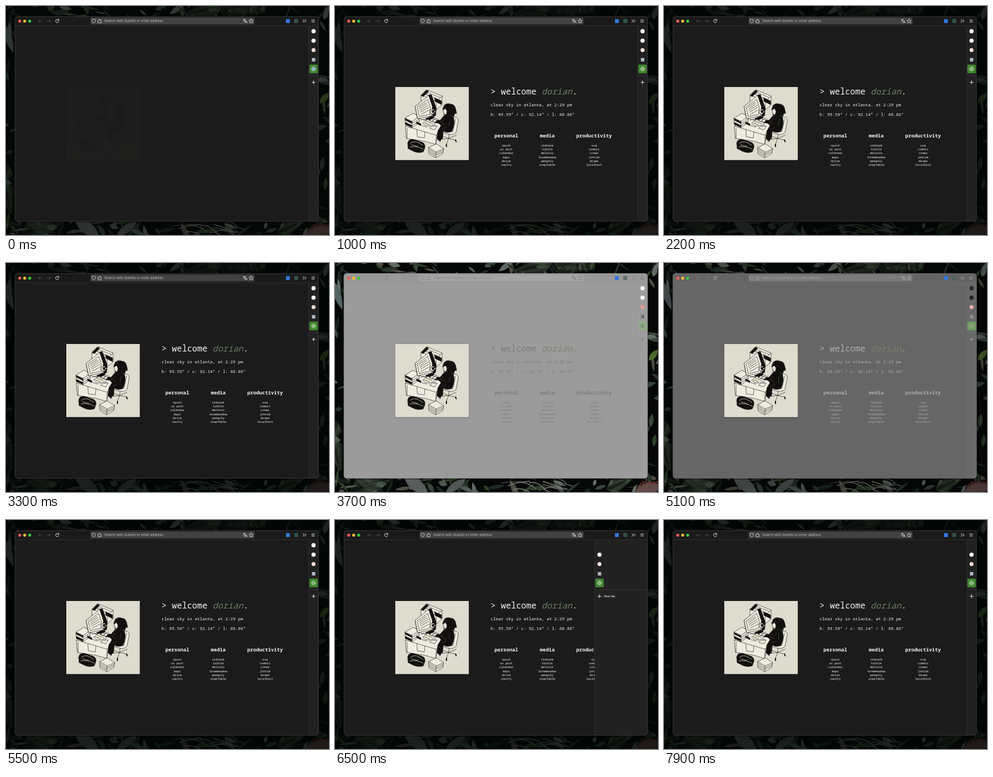
Write an HTML page that moves like this. It is 600 px wide and 427 px high and loops after 8000 ms.

```html
<!DOCTYPE html>
<html lang="en">
<head>
<meta charset="utf-8">
<title>Start page theme switch</title>
<style>
html, body { margin: 0; width: 100%; height: 100%; overflow: hidden; background: #050807; }
svg { display: block; width: 100vw; height: 100vh; }
text { white-space: pre; }
.mono { font-family: "Noto Sans Mono", "DejaVu Sans Mono", monospace; fill: var(--fg); }
.ui { font-family: Inter, "Liberation Sans", sans-serif; }
.icon { fill: none; stroke: var(--icon); stroke-width: 1; stroke-linecap: round; stroke-linejoin: round; }
.thin { stroke-width: .75; }
.ink { fill: none; stroke: #171613; stroke-width: .65; stroke-linejoin: round; stroke-linecap: round; }
.paper { fill: #eeece0; }
.black { fill: #11100e; }
</style>
</head>
<body>
<svg id="stage" viewBox="0 0 600 427" preserveAspectRatio="none">
  <defs>
    <clipPath id="frame"><rect x="16.5" y="19.5" width="564" height="382" rx="5"/></clipPath>
  </defs>

  <rect width="600" height="427" fill="#070b09"/>
  <g id="jungle"></g>
  <rect id="night" width="600" height="427" fill="#020504"/>

  <rect x="15.5" y="19.5" width="566" height="384" rx="6" fill="#000" opacity=".45"/>
  <g clip-path="url(#frame)">
    <rect x="16" y="19" width="565" height="383" fill="var(--bg)"/>

    <g id="page">
      <rect x="111" y="150" width="139" height="139.500" fill="#000" opacity=".12"/>
      <rect x="112" y="151" width="136.500" height="136.300" fill="#dedbcf"/>
      <g id="art" class="ink">
        <!-- boxes behind the screen -->
        <path class="paper" d="M160 166L170 156L199 168L199 184L188 194L160 181Z"/>
        <path d="M160 166L188 178L199 168M188 178V194M164 163L192 175M167 159L196 171M172 157L171 166"/>
        <path class="black" d="M160 167L170 157L174 159L164 169ZM185 171L198 177V184L186 178Z"/>
        <!-- desk -->
        <path class="paper" d="M131 224L165 203L203 220L189 248L187 258L166 252L133 247Z"/>
        <path d="M131 224L188 241L201 221M188 241L187 258M152 231L153 244L166 246L167 235M134 228V247"/>
        <!-- left stack -->
        <path class="paper" d="M130 209L145 200L157 206L156 218L143 227L131 221Z"/>
        <path d="M130 209L143 215L157 206M143 215V227M131 213L143 219L156 211M131 217L143 223L156 215"/>
        <path class="black" d="M131 210L143 216V219L131 213ZM131 217L143 223V226L131 221Z"/>
        <!-- screen -->
        <path class="paper" d="M149 187L166 174L178 183L186 204L168 213L153 209Z"/>
        <path class="black" d="M174 166L179 165L188 190L187 204L182 207L177 184Z"/>
        <path class="paper" d="M149 187L174 167L181 188L179 205L154 210Z"/>
        <path d="M153 188L172 174L177 189L176 202L157 206Z"/>
        <path d="M156 189L169 180M157 192L171 182M158 195L173 185M159 198L174 189M160 202L175 194M178 168L185 189"/>
        <path class="black" d="M168 210L180 205L185 208L173 214Z"/>
        <!-- desk clutter -->
        <path class="paper" d="M163 218L173 211L180 216L187 209L193 213L185 220L177 224L168 223ZM177 194L183 192L187 197L182 202L177 200Z"/>
        <path d="M166 218L176 222M170 215L181 219M174 213L183 216M160 213L166 211L169 214M158 222L171 226M181 225L187 222"/>
        <path class="black" d="M152 216L160 220L159 223L151 219ZM180 195L185 194L184 199L181 199Z"/>
        <path d="M181 224L190 224L185 231L176 228Z" fill="#eeece0"/>
        <path d="M169 220L171 216M174 221L177 216" stroke="#b88d45"/>
        <!-- chair -->
        <path class="paper" d="M217 207Q230 206 229 214L225 235Q220 241 211 239L201 236L202 230L214 230Z"/>
        <path d="M224 211L219 234L205 235M212 239L211 247M211 247L196 249M211 247L224 250M211 247L207 258M211 247L225 241M211 247L198 242"/>
        <path d="M196 249L195 252M224 250L225 253M207 258V262M198 242L197 245" stroke-width="2.200"/>
        <!-- figure at the desk -->
        <path class="black" d="M203 204Q211 201 220 207Q224 220 217 234Q208 238 201 233L200 247L193 251L189 247L191 233L197 223L193 219L184 217L184 213L195 213Z"/>
        <path class="black" d="M203 185Q208 180 215 183Q222 183 224 191L226 200L222 201L221 206L215 204L209 206L206 202L202 203L203 198L200 193Z"/>
        <path class="paper" d="M201 194L205 191L208 196L207 202L203 202ZM182 213L187 211L189 215L184 217Z"/>
        <path d="M202 212L196 217L205 221M206 226L198 230M214 211L212 223" stroke="#77756d" stroke-width=".4"/>
        <!-- bag -->
        <path class="black" d="M135 255Q137 247 147 249L162 254Q168 257 167 264L164 272Q155 275 146 271L136 266Z"/>
        <path d="M140 256Q147 250 157 256L163 260M139 263Q151 260 164 267M142 259L154 262" stroke="#d8d5c8" stroke-width=".8"/>
        <!-- front stack -->
        <path class="paper" d="M174 264L188 257L202 266L200 275L187 283L175 276Z"/>
        <path d="M174 264L188 272L202 266M188 272L187 283M175 267L188 275L201 269M175 270L188 278L201 272M175 273L187 280"/>
      </g>

      <text class="mono" x="289" y="165" font-size="15.800">&gt; welcome <tspan font-style="italic" fill="var(--name)">dorian</tspan>.</text>
      <text class="mono" x="289" y="187" font-size="7.900">clear sky in atlanta, at 2:29 pm</text>
      <text class="mono" x="289" y="205" font-size="7.900">h: 95.59° / c: 92.14° / l: 88.86°</text>
      <g id="links" class="mono" text-anchor="middle"></g>
    </g>

    <!-- toolbar -->
    <rect x="16" y="19" width="565" height="17.500" fill="var(--bar)"/>
    <path d="M16 36.800H581" stroke="var(--line)" stroke-width=".8"/>
    <circle cx="25.500" cy="28.200" r="2.800" fill="#f05d55"/>
    <circle cx="34.700" cy="28.200" r="2.800" fill="#f4bd35"/>
    <circle cx="44" cy="28.200" r="2.800" fill="#31c944"/>
    <rect x="157" y="21.500" width="304.500" height="12.800" rx="2" fill="var(--field)"/>
    <text class="ui" x="182.500" y="30.300" font-size="6.300" fill="var(--hint)">Search with Quento or enter address</text>
    <g class="icon thin">
      <path d="M67 28H60.500M63 25.500L60.500 28L63 30.500M76 28H82.500M80 25.500L82.500 28L80 30.500" stroke="var(--dim)"/>
      <path d="M97.600 26.300A3 3 0 1 0 98 29M98 24.800V26.800H96" stroke-width="1"/>
      <path d="M163 24.500L166 25.600V28Q165.500 30.600 163 31.700Q160.500 30.600 160 28V25.600Z"/>
      <path d="M171 27H172.800V25.800A1 1 0 0 1 175 25.800V27H176.800V31.300H171V29.900A1 1 0 0 0 171 28.200Z"/>
      <path d="M440.500 25.500H445M442.700 24.500V25.500M444 25.500Q443 28.500 440.700 29.500M441.500 26.500L444 29M444 31.500L446 27L448 31.500M444.800 30H447.200"/>
      <path id="star"/>
      <path d="M551.500 25.500L554 28L551.500 30.500M555 25.500L557.500 28L555 30.500" stroke-width="1"/>
      <path d="M567.800 25.800H573.200M567.800 28H573.200M567.800 30.200H573.200"/>
    </g>
    <rect x="520" y="24.500" width="7.300" height="7.300" rx="1" fill="#3477dc"/>
    <rect x="535.500" y="24.300" width="7.300" height="7.500" rx="1" fill="var(--badge)"/>

    <!-- tab strip -->
    <g id="side">
      <rect x="562.500" y="37" width="110" height="366" fill="var(--side)"/>
      <path d="M562.300 37V402M565 130H677" stroke="var(--line)" stroke-width=".8"/>
      <circle id="first" cx="571.300" cy="47" r="3.900" fill="var(--mark)"/>
      <circle cx="571.300" cy="64.600" r="3.900" fill="var(--mark)"/>
      <circle cx="571.300" cy="82.200" r="3.700" fill="var(--round)"/>
      <rect x="568.300" y="97" width="6.200" height="6.500" fill="var(--square)"/>
      <rect x="563.500" y="109.300" width="15.700" height="16.300" rx="1.800" fill="var(--tab)"/>
      <g class="icon thin" stroke="var(--globe)">
        <circle id="globe" cx="571.300" cy="117.400" r="3.600" stroke="var(--globe)"/>
        <path d="M567.700 117.400H574.900M571.300 113.800Q567.900 117.400 571.300 121Q574.700 117.400 571.300 113.800" stroke="var(--globe)"/>
      </g>
      <path class="icon" d="M568.300 142.300H574.300M571.300 139.300V145.300" stroke-width="1.200"/>
      <text class="ui" x="580" y="144.200" font-size="5.100" font-weight="500" fill="var(--fg)">New tab</text>
    </g>
  </g>
  <rect x="16.800" y="19.800" width="563.600" height="381.500" rx="5" fill="none" stroke="var(--edge)" stroke-width=".7"/>
</svg>

<script>
const $ = id => document.getElementById(id);
const clamp = v => Math.max(0, Math.min(1, v));
const smooth = v => { v = clamp(v); return v * v * (3 - 2 * v); };
const ramp = (t, a, b) => clamp((t - a) / (b - a));

// Background foliage, in daylight colours
let seed = 41;
const rnd = () => (seed = seed * 16807 % 2147483647) / 2147483647;
const between = (a, b) => a + rnd() * (b - a);
const pick = list => list[Math.floor(rnd() * list.length)];
const greens = ['#4d6151', '#34483a', '#74837b', '#223229', '#766d61', '#929d95', '#3c5833', '#18241d'];

function leaf(x, y, len, angle, wide, color) {
  const n = v => v.toFixed(1), half = len / 2;
  return `<g transform="translate(${n(x)} ${n(y)}) rotate(${n(angle)})">
    <path d="M0 0Q${n(half)} ${n(-wide)} ${n(len)} 0Q${n(half)} ${n(wide)} 0 0" fill="${color}"/>
    <path d="M0 0H${n(len)}" stroke="#b7c1b0" stroke-width=".5" opacity=".5"/></g>`;
}

function frond(x, y, len, angle, color) {
  let out = '';
  const a = angle * Math.PI / 180;
  for (let i = 2; i < 22; i++) {
    const d = i / 22 * len, size = len * .36 * (1.1 - i / 22);
    for (const side of [-1, 1])
      out += leaf(x + Math.cos(a) * d, y + Math.sin(a) * d, size, angle + side * 42, 1.3, color);
  }
  return out;
}

function jungle() {
  let out = '';
  for (let i = 0; i < 150; i++) {
    const u = rnd(), len = between(12, 38);
    const [x, y] = u < .33 ? [between(0, 600), between(-6, 18)]
      : u < .7 ? [between(0, 600), between(402, 430)]
      : u < .85 ? [between(-8, 14), between(0, 427)] : [between(582, 604), between(0, 427)];
    out += leaf(x, y, len, between(0, 360), between(3, 11), pick(greens));
  }
  for (const [x, y, len, angle] of [[395, -8, 90, 12], [410, -4, 80, 165], [20, 428, 95, -18],
    [95, 432, 70, -150], [-8, 320, 70, 75], [6, 290, 60, 110], [500, 425, 60, -25]])
    out += frond(x, y, len, angle, pick(['#56764a', '#69785f', '#48624a']));
  out += leaf(128, 398, 55, 35, 22, '#858b8c') + leaf(205, 429, 46, -35, 15, '#77807b')
    + leaf(583, 182, 26, -50, 11, '#709b43') + leaf(-5, 30, 60, 72, 13, '#7d9292');
  for (let i = 0; i < 15; i++) {
    const x = between(300, 425), y = between(402, 428);
    out += `<path d="M${x} ${y}q${between(4, 16)} ${between(-14, 6)} ${between(20, 48)} ${between(-9, 16)}"
      fill="none" stroke="#b7b4ac" stroke-width="${between(.7, 1.8)}"/>`;
  }
  out += leaf(555, 427, 54, -12, 22, '#7f7d77');
  for (let i = 0; i < 9; i++)
    out += `<path d="M${560 + i * 5} 427q2 -12 14 -20" fill="none" stroke="#bc5350" stroke-width="1.600"/>`;
  return out;
}
$('jungle').innerHTML = jungle();

$('star').setAttribute('d', 'M' + Array.from({ length: 10 }, (_, i) => {
  const r = i % 2 ? 1.9 : 4.1, a = i * Math.PI / 5 - Math.PI / 2;
  return `${(455.3 + r * Math.cos(a)).toFixed(2)} ${(28.2 + r * Math.sin(a)).toFixed(2)}`;
}).join('L') + 'Z');

const columns = [
  [318.300, 'personal', 'zpost,uv post,calendar,maps,drive,vaulty'],
  [394.300, 'media', 'vidnook,talkle,melovio,tonemeadow,peepoly,snapfable'],
  [481.300, 'productivity', 'ovq,coders,crews,jotrim,drawo,localhost']
];
$('links').innerHTML = columns.map(([x, title, items]) =>
  `<text x="${x}" y="244.500" font-size="9.200" font-weight="600">${title}</text>` +
  items.split(',').map((s, i) =>
    `<text x="${x}" y="${262 + i * 7.2}" font-size="5.500">${s}</text>`).join('')).join('');

// Each entry: dark colour, light colour
const theme = {
  bg: ['1b1b1b', 'fcfcfc'], bar: ['1a1a1a', 'f8f8f8'], side: ['212121', 'fafafa'],
  line: ['363636', 'dedede'], edge: ['474747', 'd2d2d2'], field: ['424242', 'eeeeee'],
  hint: ['c0c0c0', '606060'], icon: ['eeeeee', '292929'], dim: ['606060', 'bcbcbc'],
  fg: ['f4f4f4', '222222'], name: ['6c7e63', '898777'], tab: ['438632', 'c8c8c8'],
  badge: ['31514c', '858585'], round: ['f1ded8', 'df6653'], square: ['aebac5', '393939'],
  globe: ['d6e9d0', '292929']
};
const channels = hex => [0, 2, 4].map(i => parseInt(hex.slice(i, i + 2), 16));
const mix = ([a, b], k) => {
  const p = channels(a), q = channels(b);
  return `rgb(${p.map((v, i) => Math.round(v + (q[i] - v) * k))})`;
};

const style = $('stage').style;
function draw(now) {
  const t = Math.floor(now % 8000 / 100) * 100;
  const light = ramp(t, 3330, 3980) - ramp(t, 4700, 5300);
  for (const key in theme) style.setProperty('--' + key, mix(theme[key], light));
  style.setProperty('--mark', t >= 4500 && t < 5300 ? '#252525' : '#fafafa');

  const day = Math.max(light, .16 * (1 - ramp(t, 0, 400)));
  $('night').setAttribute('opacity', .8 * (1 - day));
  $('page').setAttribute('opacity', Math.max(.012, smooth(t / 1000)));
  $('globe').setAttribute('fill', t < 700 ? '#3c78bd' : 'none');
  $('first').setAttribute('opacity', t < 5600 ? 1 : 0);

  const open = smooth(ramp(t, 6150, 6450)) - smooth(ramp(t, 7050, 7350));
  $('side').setAttribute('transform', `translate(${-80 * open} 0)`);
  requestAnimationFrame(draw);
}
draw(0);
</script>
</body>
</html>
```
